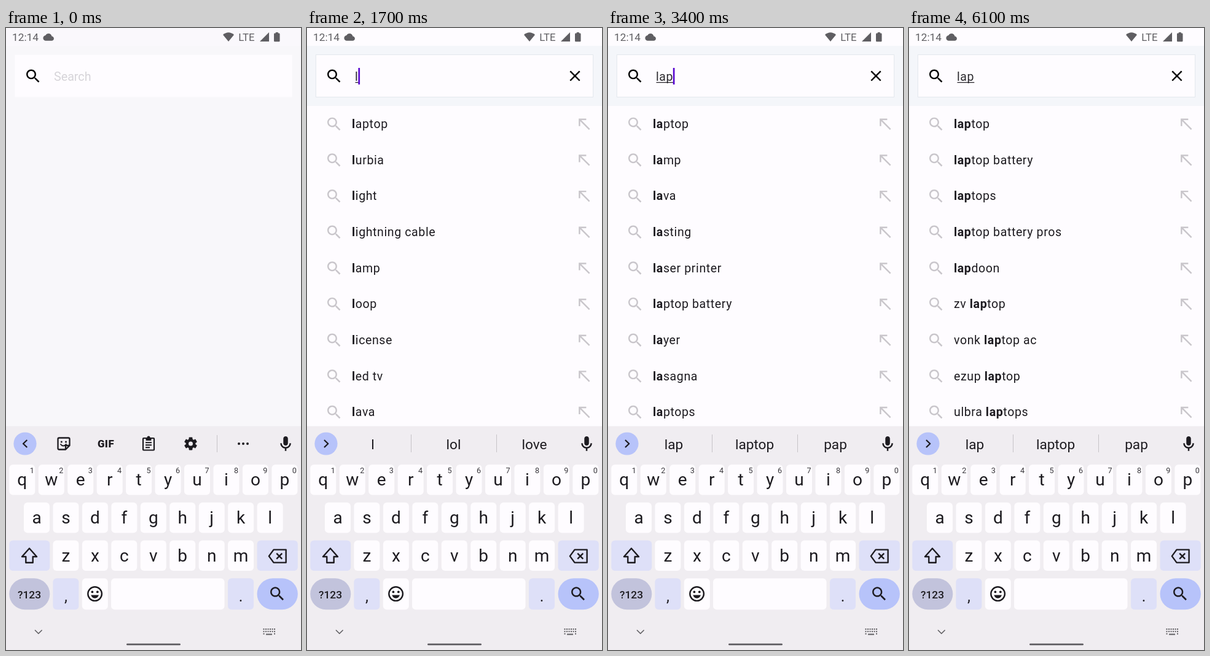
Animation, 480 px wide and 1013 px high, one loop 6200 ms. Source, as an HTML page:

```html
<!DOCTYPE html>
<html lang="en">
<head>
<meta charset="utf-8">
<title>Search suggestions</title>
<style>
html, body { margin: 0; width: 100%; height: 100%; overflow: hidden; background: #fefcff; }
svg { display: block; width: 100vw; height: 100vh; }
text { font-family: Roboto, "Noto Sans", sans-serif; white-space: pre; }
.row { font-size: 19.55px; letter-spacing: .61px; fill: #1d1b20; }
.bold { font-weight: 700; }
</style>
</head>
<body>
<svg id="stage" viewBox="0 0 480 1013" preserveAspectRatio="none"></svg>
<script>
const NS = 'http://www.w3.org/2000/svg';
const stage = document.getElementById('stage');
const LOOP = 6200;
const INK = '#1d1b20', PAPER = '#fefcff', BLUE = '#b7c3fa', PALE = '#dee0f8', GREY = '#5f5e62';
const LENS = 'M15.5 14h-.79l-.28-.27C15.41 12.59 16 11.11 16 9.5 16 5.91 13.09 3 9.5 3S3 5.91 3 9.5 5.91 16 9.5 16c1.61 0 3.09-.59 4.23-1.57l.27.28v.79l5 4.99L20.49 19l-4.99-5zM9.5 14C7.01 14 5 11.99 5 9.5S7.01 5 9.5 5 14 7.01 14 9.5 11.99 14 9.5 14z';
const ARROW = 'M5 15h2V8.41L18.59 20 20 18.59 8.41 7H15V5H5z';
const CROSS = 'M19 6.41 17.59 5 12 10.59 6.41 5 5 6.41 10.59 12 5 17.59 6.41 19 12 13.41 17.59 19 19 17.59 13.41 12z';
const CLOUD = 'M19.35 10.04C18.67 6.59 15.64 4 12 4 9.11 4 6.6 5.64 5.35 8.04 2.34 8.36 0 10.91 0 14c0 3.31 2.69 6 6 6h13c2.76 0 5-2.24 5-5 0-2.64-2.05-4.78-4.65-4.96z';
const MIC = 'M12 14c1.66 0 3-1.34 3-3V5c0-1.66-1.34-3-3-3S9 3.34 9 5v6c0 1.66 1.34 3 3 3zM17 11c0 2.76-2.24 5-5 5s-5-2.24-5-5H5c0 3.53 2.61 6.43 6 6.92V21h2v-3.08c3.39-.49 6-3.39 6-6.92z';

function add(parent, tag, attrs, content) {
  const el = document.createElementNS(NS, tag);
  for (const k in attrs) el.setAttribute(k, attrs[k]);
  if (content !== undefined) el.textContent = content;
  parent.appendChild(el);
  return el;
}
const group = (parent = stage) => add(parent, 'g', {});
const rect = (p, x, y, width, height, fill, rx = 0) => add(p, 'rect', { x, y, width, height, fill, rx });
const dot = (p, cx, cy, r, fill) => add(p, 'circle', { cx, cy, r, fill });
const icon = (p, d, x, y, s, fill) => add(p, 'path', { d, fill, transform: `translate(${x} ${y}) scale(${s})` });
const line = (p, d, w = 2.3, stroke = INK) => add(p, 'path', { d, fill: 'none', stroke, 'stroke-width': w, 'stroke-linejoin': 'round' });
const label = (p, s, x, y, size, fill = INK, anchor = 'start', weight = 400) =>
  add(p, 'text', { x, y, fill, 'font-size': size, 'text-anchor': anchor, 'font-weight': weight }, s);
const show = (el, on) => el.setAttribute('display', on ? 'inline' : 'none');

// Page and search field
const bar = rect(stage, 0, 0, 480, 29, PAPER);
const page = rect(stage, 0, 29, 480, 620, '#f4f6fa');
const field = rect(stage, 14.5, 43.5, 451, 69, PAPER);
field.setAttribute('stroke', '#e4e8ed');
icon(stage, LENS, 29.4, 63.8, 1.222, '#000');
const hint = group();
label(hint, 'Search', 78, 86, 19.7, '#c6c4c9');
const dots = label(hint, '…', 138.5, 86, 19.7, '#c6c4c9');
const query = label(stage, '', 78, 86, 19.55, '#2c2a2f');
query.setAttribute('letter-spacing', .6);
const under = rect(stage, 78.5, 88, 0, 1.3, '#2c2a2f');
const caret = rect(stage, 78, 65, 2.7, 27, '#5a0ad0');
const clear = icon(stage, CROSS, 421.3, 63.4, 1.222, '#000');

// Status bar
label(stage, '12:14', 10, 21, 17.3, GREY);
icon(stage, CLOUD, 60.4, 6.2, .73, GREY);
add(stage, 'path', { d: 'M353 11Q362 3.5 371 11L362 22Z', fill: GREY });
label(stage, 'LTE', 378.3, 20.5, 16.7, GREY);
add(stage, 'path', { d: 'M413 22L428 7V22Z', fill: GREY });
rect(stage, 436, 8.6, 9.5, 13.6, GREY, 1.3);
rect(stage, 438.8, 7, 4, 3, GREY);

// Suggestion lists
const LISTS = {
  l: ['laptop', 'lurbia', 'light', 'lightning cable', 'lamp', 'loop', 'license', 'led tv', 'lava'],
  la: ['laptop', 'lamp', 'lava', 'lasting', 'laser printer', 'laptop battery', 'layer', 'lasagna', 'laptops'],
  lap: ['laptop', 'laptop battery', 'laptops', 'laptop battery pros', 'lapdoon', 'zv laptop', 'vonk laptop ac', 'ezup laptop', 'ulbra laptops']
};
const panel = group();
rect(panel, 0, 127, 480, 522, PAPER);
const rowY = i => 156 + i * 58.65;
for (let i = 0; i < 9; i++) {
  icon(panel, LENS, 29.4, rowY(i) - 14, 1.222, '#c9c6cb');
  icon(panel, ARROW, 436, rowY(i) - 14.5, 1.222, '#c9c6cb');
}
const lists = {};
for (const key in LISTS) {
  lists[key] = group(panel);
  LISTS[key].forEach((item, i) => {
    const at = item.indexOf(key);
    const t = add(lists[key], 'text', { x: 73, y: rowY(i) + 7, class: 'row' });
    add(t, 'tspan', {}, item.slice(0, at));
    add(t, 'tspan', { class: 'bold' }, key);
    add(t, 'tspan', {}, item.slice(at + key.length));
  });
}

// Keyboard strip
rect(stage, 0, 648.5, 480, 365, '#f0edf1');
dot(stage, 31, 677, 18.6, BLUE);
icon(stage, MIC, 440, 662.4, 1.25, INK);
const tools = group(), words = group();
line(tools, 'M34.3 671L28 677L34.3 683');
line(words, 'M28 671L34.3 677L28 683');

line(tools, 'M86.5 667.5H101.5Q103.5 667.5 103.5 669.5V680L97 686.5H86.5Q84.5 686.5 84.5 684.5V669.5Q84.5 667.5 86.5 667.5ZM103.5 680H97V686.5');
line(tools, 'M88.5 677.5Q93 683.5 98.5 677.5', 2);
dot(tools, 90.3, 674, 1.5, INK);
dot(tools, 97.5, 674, 1.5, INK);
label(tools, 'GIF', 162.5, 683, 16.8, INK, 'middle', 900).setAttribute('letter-spacing', .5);
line(tools, 'M224 668H240Q241 668 241 669V686.5Q241 687.5 240 687.5H224Q223 687.5 223 686.5V669Q223 668 224 668Z', 2.2);
rect(tools, 227.5, 667, 9, 5, INK, 1);
dot(tools, 232, 667, 2.5, INK);
for (let i = 0; i < 3; i++) rect(tools, 227, 674.2 + i * 4, i < 2 ? 10 : 7, 2, INK);
for (let i = 0; i < 6; i++) {
  const tooth = rect(tools, 297.6, 666.6, 5.8, 6, INK, .8);
  tooth.setAttribute('transform', `rotate(${i * 60} 300.5 677)`);
}
add(tools, 'circle', { cx: 300.5, cy: 677, r: 5.7, fill: 'none', stroke: INK, 'stroke-width': 4.4 });
rect(tools, 343, 663, 1, 28, '#c6c3c8');
for (let i = 0; i < 3; i++) dot(tools, 379 + i * 7, 677, 2, INK);

rect(words, 169, 662, 1, 29, '#c6c3c8');
rect(words, 308, 662, 1, 29, '#c6c3c8');
const slots = [107, 238.5, 370].map(x => label(words, '', x, 686, 22.6, INK, 'middle'));

// Keys
const PITCH = 47.45;
const key = (x, y, w, fill = PAPER, h = 49.5, r = 6) => rect(stage, x, y, w, h, fill, r);
function keyRow(chars, x0, y) {
  [...chars].forEach((c, i) => {
    const x = x0 + i * PITCH;
    key(x, y, 42);
    label(stage, c, x + 21, y + 34.4, 28, INK, 'middle');
  });
}
keyRow('qwertyuiop', 5.3, 711);
for (let i = 0; i < 10; i++) label(stage, (i + 1) % 10, 42.3 + i * PITCH, 725, 12.6, '#3a383d', 'middle');
keyRow('asdfghjkl', 29, 772.7);
keyRow('zxcvbnm', 76.4, 834.5);
key(5.3, 834.5, 66, PALE);
key(408.5, 834.5, 66.3, PALE);
line(stage, 'M38 847.5L50 861H43.7V870.7H32.3V861H26Z', 2.4);
line(stage, 'M435.5 849.6H455.6V870.6H435.5L427.8 860.1Z', 2.4);
line(stage, 'M440.2 855.6L449.2 864.6M449.2 855.6L440.2 864.6', 2.4);

key(5.3, 896.3, 66, '#c2c3dc', 51, 25.5);
key(76.4, 896.3, 42, PALE, 51);
key(123.8, 896.3, 42, PAPER, 51);
key(171, 896.3, 184.5, PAPER, 51);
key(361, 896.3, 42, PALE, 51);
key(408.5, 896.3, 66.3, BLUE, 51, 25.5);
label(stage, '?123', 38, 929, 17.4, INK, 'middle', 500);
label(stage, ',', 97.4, 934, 25, INK, 'middle');
label(stage, '.', 382, 934, 25, INK, 'middle');
add(stage, 'circle', { cx: 144.6, cy: 921.6, r: 11.3, fill: 'none', stroke: INK, 'stroke-width': 2.4 });
dot(stage, 140.4, 918.4, 1.9, INK);
dot(stage, 148.8, 918.4, 1.9, INK);
add(stage, 'path', { d: 'M138.2 923.5H151Q149 928.8 144.6 928.8T138.2 923.5Z', fill: INK });
icon(stage, LENS, 426.3, 906.6, 1.25, INK);

// Navigation bar
line(stage, 'M47 980.5L52.8 986.3L58.6 980.5', 1.6, GREY);
for (let r = 0; r < 2; r++)
  for (let c = 0; c < 6; c++) rect(stage, 418.5 + c * 3.5, 978 + r * 3.8, 2, 2, GREY);
rect(stage, 418.5, 985.6, 2, 2, GREY);
rect(stage, 423, 986.5, 10, 2, GREY);
rect(stage, 436, 985.6, 2, 2, GREY);
rect(stage, 196, 1002.5, 88, 2.8, '#5d5b60', 1.4);

// Each entry holds from its time until the next one
const QUERY = [[0, ''], [1500, 'l'], [2100, 'la'], [3300, 'lap']];
const LIST = [[0, ''], [1600, 'l'], [2400, 'la'], [3600, 'lap']];
const WORDS = [[0, ''], [1300, 'l lol love'], [2000, 'la LA last'], [3200, 'lap laptop pap']];
const CARET = [[0, 0], [600, 1], [1100, 0], [1400, 1], [1900, 0], [2100, 1], [2600, 0], [3100, 1],
  [3800, 0], [4300, 1], [4800, 0], [5300, 1], [5800, 0]];
const WIDTH = { '': 0, l: 5.4, la: 16.6, lap: 27.8 };
const at = (track, t) => track.filter(e => e[0] <= t).pop()[1];
const mix = (a, b, k) => `rgb(${a.map((v, i) => Math.round(v + (b[i] - v) * k))})`;

function draw(ms) {
  const t = Math.floor(ms % LOOP / 100) * 100;
  const k = Math.min(1, t / 400);
  bar.setAttribute('fill', mix([250, 248, 252], [254, 252, 255], k));
  page.setAttribute('fill', mix([248, 247, 250], [244, 246, 250], k));
  field.setAttribute('stroke-opacity', k);
  hint.setAttribute('opacity', .7 + .3 * k);
  dots.setAttribute('opacity', k);

  const q = at(QUERY, t), list = at(LIST, t), w = at(WORDS, t);
  show(hint, !q);
  show(clear, q);
  query.textContent = q;
  under.setAttribute('width', WIDTH[q]);
  caret.setAttribute('x', 78 + WIDTH[q]);
  show(caret, at(CARET, t));
  show(panel, list);
  for (const name in lists) show(lists[name], name === list);
  show(tools, !w);
  show(words, w);
  const parts = w.split(' ');
  slots.forEach((s, i) => { s.textContent = parts[i] || ''; });
}

const start = performance.now();
function tick() {
  draw(performance.now() - start);
  requestAnimationFrame(tick);
}
draw(0);
requestAnimationFrame(tick);
</script>
</body>
</html>
```
